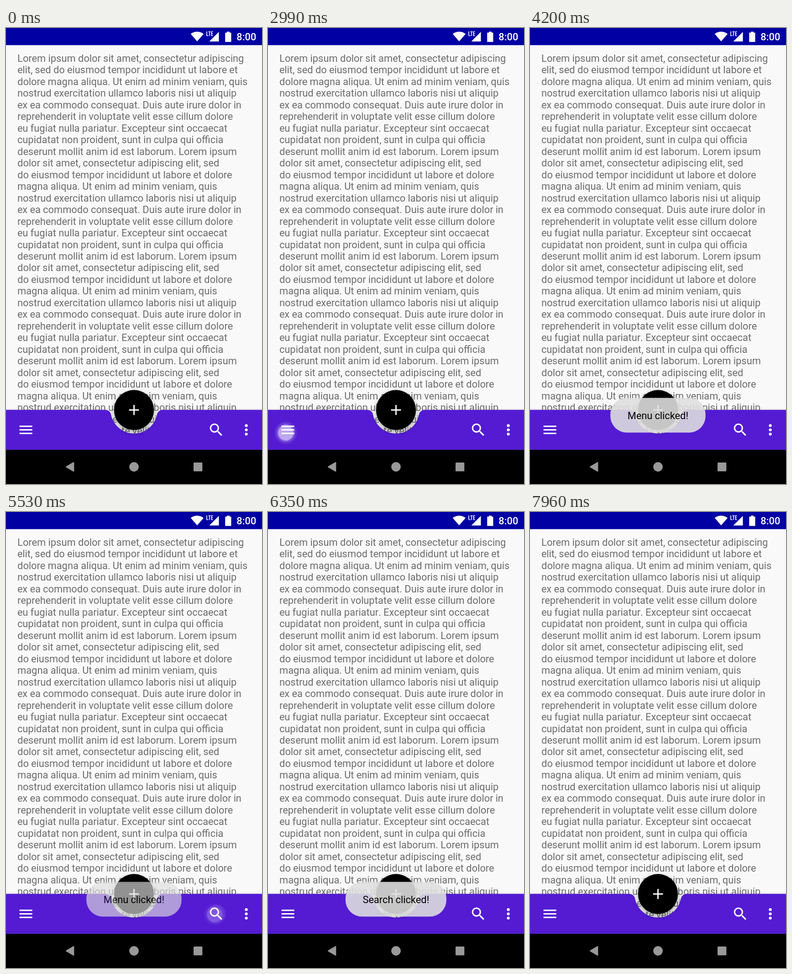
Recreate the animation shown at these times as an HTML page with a canvas. Size 561 by 998 pixels, loop 8 s.

```html
<!DOCTYPE html>
<html lang="en">
<head>
<meta charset="utf-8">
<title>Bottom app bar</title>
<style>
html, body { margin: 0; width: 561px; height: 998px; overflow: hidden; background: #f9f9fa; }
#stage { position: relative; width: 561px; height: 998px; overflow: hidden; }
canvas { position: absolute; left: 0; top: 0; display: block; }
#toast { opacity: 0; }
</style>
</head>
<body>
<div id="stage">
<canvas id="view" width="561" height="998"></canvas>
<canvas id="toast" width="561" height="998"></canvas>
</div>
<script>
const W = 561, H = 998, LOOP = 8000;
const view = document.getElementById('view').getContext('2d');
const toast = document.getElementById('toast');
const base = document.createElement('canvas');
base.width = W;
base.height = H;
let ctx = base.getContext('2d');

const PX = W / 1080;          // one device pixel
const UNIT = 3 * PX;          // one dp
const BAR = { top: 835.8, bottom: 923.1, mid: 879.5, color: '#541bd3' };
const FAB = { x: 280.5, y: 836, r: 43.7 };

const head = [
  'Lorem ipsum dolor sit amet, consectetur adipiscing',
  'elit, sed do eiusmod tempor incididunt ut labore et',
  'dolore magna aliqua. Ut enim ad minim veniam, quis'
];
const body = [
  'nostrud exercitation ullamco laboris nisi ut aliquip',
  'ex ea commodo consequat. Duis aute irure dolor in',
  'reprehenderit in voluptate velit esse cillum dolore',
  'eu fugiat nulla pariatur. Excepteur sint occaecat',
  'cupidatat non proident, sunt in culpa qui officia',
  'deserunt mollit anim id est laborum. Lorem ipsum',
  'dolor sit amet, consectetur adipiscing elit, sed',
  'do eiusmod tempor incididunt ut labore et dolore',
  'magna aliqua. Ut enim ad minim veniam, quis'
];

// Finger spots and the icon ripple that follows each release
const taps = [
  { x: 39, y: 886, icon: 43.5, on: 2990, attack: 0, off: 3120 },
  { x: 457, y: 881, icon: 461, on: 5160, attack: 120, off: 5420 },
  { x: 526, y: 881, icon: 526.5, on: 7090, attack: 120, off: 7350 }
];
const toasts = [
  { text: 'Menu clicked!', show: 3680, hide: 5400 },
  { text: 'Search clicked!', show: 5850, hide: 7460 }
];

const clamp = v => Math.max(0, Math.min(1, v));
const easeOut = p => 1 - (1 - clamp(p)) ** 2;
const white = a => `rgba(255,255,255,${a})`;

function rect(x, y, w, h, color) {
  ctx.fillStyle = color;
  ctx.fillRect(x, y, w, h);
}

function disc(x, y, r, color) {
  ctx.fillStyle = color;
  ctx.beginPath();
  ctx.arc(x, y, r, 0, Math.PI * 2);
  ctx.fill();
}

function pill(x, y, w, h, r, color) {
  ctx.fillStyle = color;
  ctx.beginPath();
  ctx.roundRect(x, y, w, h, r);
  ctx.fill();
}

function shape(path, color) {
  ctx.fillStyle = color;
  ctx.fill(new Path2D(path));
}

function icon(cx, cy, path) {
  ctx.save();
  ctx.translate(cx, cy);
  ctx.scale(UNIT, UNIT);
  ctx.translate(-12, -12);
  shape(path, '#fff');
  ctx.restore();
}

// Glyph advances are whole device pixels, as on the phone
function glyphs(text, weight) {
  ctx.font = `${weight} 42px Roboto, sans-serif`;
  let x = 0;
  const list = text.match(/ffi|./g).map(s => {
    const g = { s, x };
    x += Math.round(ctx.measureText(s).width);
    return g;
  });
  return { list, width: x * PX };
}

function write(text, x, y, color, weight = 400) {
  ctx.save();
  const { list } = glyphs(text, weight);
  ctx.translate(x, y);
  ctx.scale(PX, PX);
  ctx.fillStyle = color;
  for (const g of list) ctx.fillText(g.s, g.x, 0);
  ctx.restore();
}

function drawText() {
  for (let i = 0; i < 33; i++) {
    const line = i < 3 ? head[i] : body[(i - 3) % body.length];
    write(line, 48 * PX, 74 + i * 25.47, '#6c6c6d');
  }
}

function drawStatus() {
  rect(0, 0, W, 37.5, '#0000a3');
  shape('M418.9 29.2L433 13C432.4 12.5 427 8 418.9 8S405.4 12.5 404.8 13Z', '#fff');
  shape('M466.5 8.5V29.5H445.5Z', '#fff');
  rect(438, 6, 17, 12.5, '#0000a3');
  ctx.strokeStyle = '#fff';
  ctx.lineWidth = 1.6;
  ctx.stroke(new Path2D('M440 7.5V16.7H443.6 M443.4 8.3H448.6 M446 8.3V17.5 M453.6 8.3H450.4V16.7H453.6 M450.4 12.5H453.2'));
  shape('M484 8H490V10.2H493.5V30.5H480.3V10.2H484Z', '#fff');
  write('8:00', 505.3, 27, '#fff', 500);
}

function drawBar() {
  const cradle = FAB.r + 7.8, corner = 12.4;
  const dx = Math.sqrt((cradle + corner) ** 2 - corner ** 2);
  const a = Math.atan2(corner, dx), cy = BAR.top + corner, up = -Math.PI / 2;
  ctx.save();
  ctx.shadowColor = 'rgba(0,0,0,.2)';
  ctx.shadowBlur = 5;
  ctx.beginPath();
  ctx.moveTo(0, BAR.top);
  ctx.arc(FAB.x - dx, cy, corner, up, -a);
  ctx.arc(FAB.x, FAB.y, cradle, Math.PI - a, a, true);
  ctx.arc(FAB.x + dx, cy, corner, Math.PI + a, Math.PI * 1.5);
  ctx.lineTo(W, BAR.top);
  ctx.lineTo(W, BAR.bottom);
  ctx.lineTo(0, BAR.bottom);
  ctx.closePath();
  ctx.fillStyle = BAR.color;
  ctx.fill();
  ctx.restore();
}

function drawFab() {
  ctx.save();
  ctx.shadowColor = 'rgba(0,0,0,.36)';
  ctx.shadowBlur = 11;
  ctx.shadowOffsetY = 4;
  disc(FAB.x, FAB.y, FAB.r, '#000');
  ctx.restore();
  icon(FAB.x, FAB.y, 'M19 12.9H12.9V19H11.1V12.9H5V11.1H11.1V5H12.9V11.1H19Z');
}

function drawIcons() {
  icon(43.6, BAR.mid, 'M3 18H21V16H3Z M3 13H21V11H3Z M3 6V8H21V6Z');
  icon(460.7, BAR.mid, 'M15.5 14h-.79l-.28-.27A6.47 6.47 0 0 0 16 9.5 6.5 6.5 0 1 0 9.5 16c1.61 0 3.09-.59 4.23-1.57l.27.28v.79l5 4.99L20.49 19l-4.99-5zm-6 0A4.5 4.5 0 1 1 9.5 5a4.5 4.5 0 0 1 0 9z');
  for (const dy of [-6, 0, 6]) disc(526.6, BAR.mid + dy * UNIT, 2 * UNIT, '#fff');
}

function drawNav() {
  const gray = '#999';
  rect(0, BAR.bottom, W, H - BAR.bottom, '#000');
  shape('M131.6 959.4L147.5 950.3Q149.3 949.6 149.3 951.5V969.5Q149.3 971.4 147.5 970.7L131.6 961.6Q130.3 960.5 131.6 959.4Z', gray);
  disc(280.5, 960.5, 10.4, gray);
  pill(411, 951, 19.3, 19.3, 1.5, gray);
}

function drawRipple(tap, t) {
  const p = (t - tap.off) / 430;
  if (p <= 0 || p >= 1) return;
  disc(tap.icon, BAR.mid, 12 + 19 * easeOut(p), white(0.09 * Math.min(1, p * 4) * (1 - p)));
}

function drawSpot(tap, t) {
  const grow = tap.attack ? clamp((t - tap.on + 40) / tap.attack) : 1;
  const a = t < tap.on ? 0 : grow * clamp(1 - (t - tap.off) / 170);
  if (!a) return;
  const g = ctx.createRadialGradient(tap.x, tap.y, 0, tap.x, tap.y, 26);
  const stops = [[0, 0.6], [0.59, 0.62], [0.66, 0.38], [0.76, 0.16], [1, 0]];
  for (const [at, v] of stops) g.addColorStop(at, white(v * a));
  disc(tap.x, tap.y, 26, g);
}

let shown = null;

function paintToast(text) {
  const main = ctx;
  ctx = toast.getContext('2d');
  ctx.clearRect(0, 0, W, H);
  const { width } = glyphs(text, 400);
  const x = 280.4 - width / 2;
  pill(x - 37.5, 809.5, width + 75, 76, 36, 'rgba(223,223,223,.89)');
  write(text, x, 856, '#000');
  ctx = main;
}

function updateToast(t) {
  const cur = toasts.find(o => t >= o.show && t < o.hide + 500);
  if (cur && cur !== shown) paintToast((shown = cur).text);
  const a = cur ? easeOut((t - cur.show) / 500) - clamp((t - cur.hide) / 500) : 0;
  toast.style.opacity = clamp(a);
}

function frame() {
  const t = performance.now() % LOOP;
  ctx.drawImage(base, 0, 0);
  for (const tap of taps) drawRipple(tap, t);
  drawIcons();
  for (const tap of taps) drawSpot(tap, t);
  updateToast(t);
  requestAnimationFrame(frame);
}

rect(0, 0, W, H, '#f9f9fa');
drawText();
drawStatus();
drawBar();
drawFab();
drawNav();
ctx = view;
frame();
</script>
</body>
</html>
```
